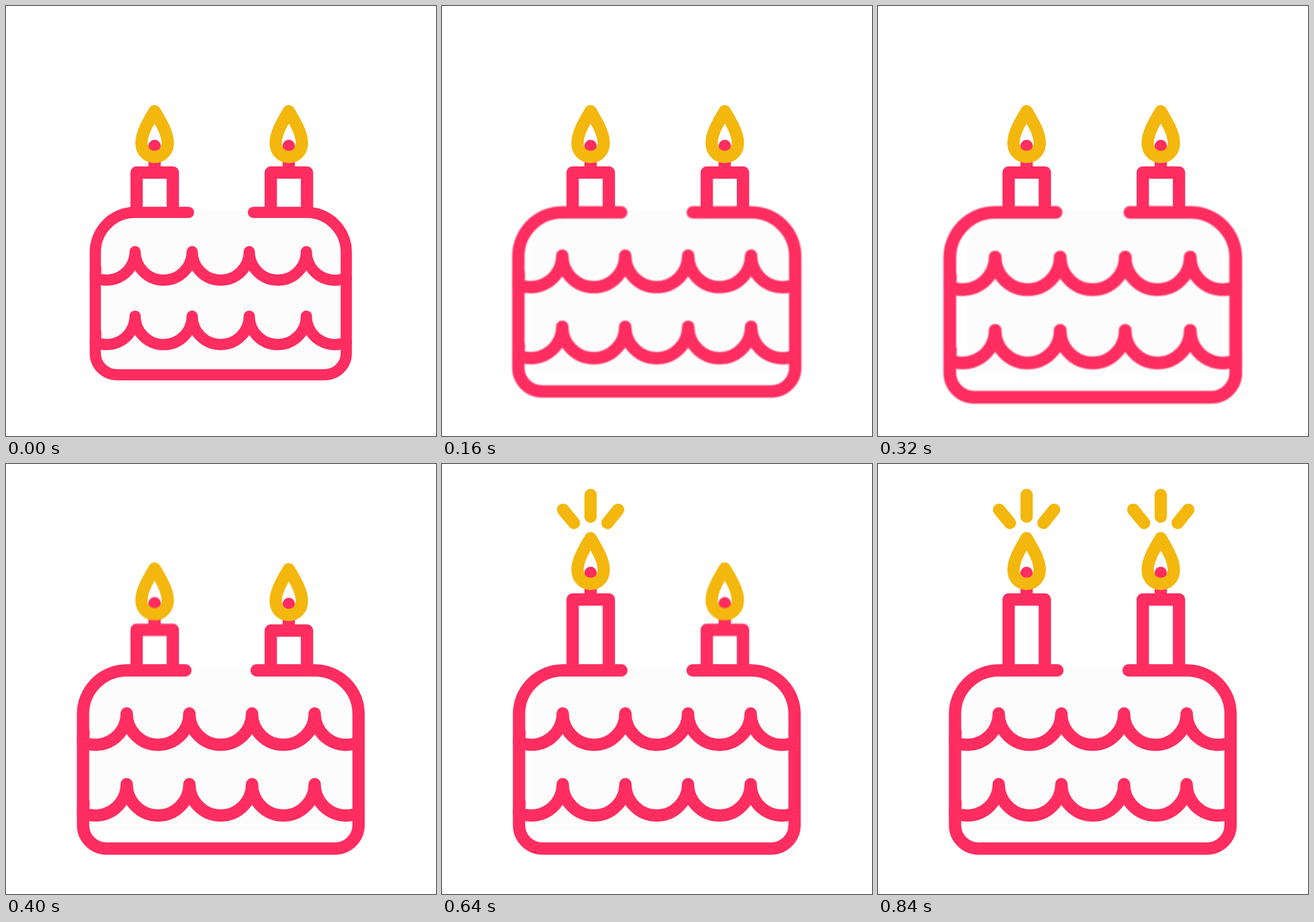
These frames come from a looping animation (748 by 748 pixels, 880 ms). An HTML page:

```html
<!DOCTYPE html>
<html lang="en">
<head>
<meta charset="utf-8">
<title>Birthday cake</title>
<style>
  html, body { margin: 0; width: 100%; height: 100%; overflow: hidden; background: #fff; }
  svg { display: block; width: 100%; height: 100%; }
  .line { fill: none; stroke: #ff2d60; stroke-width: 21.4; stroke-linecap: round; stroke-linejoin: round; }
  .gold { stroke: #f4b70e; }
  .butt { stroke-linecap: butt; }
</style>
</head>
<body>
<svg viewBox="0 0 748 748">
  <defs>
    <filter id="soft" filterUnits="userSpaceOnUse" x="0" y="0" width="748" height="748" color-interpolation-filters="sRGB">
      <feGaussianBlur stdDeviation="0.8"/>
    </filter>
  </defs>
  <path fill="#fcfcfc" d="M155 637V428a72 72 0 0 1 72-72H526a72 72 0 0 1 72 72V637Z"/>
  <g id="candles"></g>
  <g id="cake" class="line">
    <path d="M312 359H210A76 76 0 0 0 134 435V628A41 41 0 0 0 175 669H572.3A41 41 0 0 0 613.3 628V435A76 76 0 0 0 537.3 359H436"/>
    <path id="icing" d="M135 466L134 484A54.5 54.5 0 0 0 210 434a54.5 54.5 0 0 0 109 0a54.5 54.5 0 0 0 109 0a54.5 54.5 0 0 0 109 0A54.5 54.5 0 0 0 613.3 484"/>
    <use href="#icing" y="123"/>
  </g>
</svg>
<script>
const LOOP = 880, STEP = 40, LIFT = 54;
const $ = id => document.getElementById(id);
const clamp = u => Math.min(1, Math.max(0, u));
const ease = (t, a, b) => { const u = clamp((t - a) / (b - a)); return u * u * (3 - 2 * u); };
const speed = (t, a, b) => { const u = clamp((t - a) / (b - a)); return 6 * u * (1 - u) / (b - a); };

function makeCandle(x, start) {
  const id = 'blur' + start;
  document.querySelector('defs').insertAdjacentHTML('beforeend', `
    <filter id="${id}" filterUnits="userSpaceOnUse" x="-300" y="0" width="1048" height="748" color-interpolation-filters="sRGB">
      <feGaussianBlur stdDeviation="0 1"/>
    </filter>`);
  $('candles').insertAdjacentHTML('beforeend', `
    <g class="line" transform="translate(${x})">
      <path class="rays gold" d="M258.5 54V91.5M210.7 79.6L229.5 102.5M306.3 79.6L287.9 102.5"/>
      <path class="body butt"/>
      <g class="top">
        <path d="M258.5 243.5V289.5"/>
        <path class="gold" d="M258.5 183C246 204 235.7 222 235.7 238C235.7 253 246 262.5 258.5 262.5S281.3 253 281.3 238C281.3 222 271 204 258.5 183Z"/>
      </g>
    </g>`);
  const g = $('candles').lastElementChild;
  const [rays, body, top] = ['.rays', '.body', '.top'].map(s => g.querySelector(s));
  const blur = $(id).firstElementChild;

  return t => {
    const rise = [t - start, 0, 113];
    const y = LIFT * ease(...rise);
    const shine = ease(t - start, 65, 195);
    const smear = 5 * LIFT * speed(...rise);
    body.setAttribute('d', `M227.2 359V${289.7 - y}H290.2V359`);
    top.setAttribute('transform', `translate(0 ${-y})`);
    rays.setAttribute('transform', `translate(0 ${39 * (1 - shine)})`);
    rays.setAttribute('opacity', shine);
    blur.setAttribute('stdDeviation', `0 ${smear.toFixed(2)}`);
    if (smear > 0.05) g.setAttribute('filter', `url(#${id})`);
    else g.removeAttribute('filter');
  };
}

const candles = [makeCandle(0, 390), makeCandle(233.4, 630)];

function drawCake(t) {
  const s = 0.911 + 0.158 * ease(t, 34, 258) - 0.069 * ease(t, 258, 390);
  const cake = $('cake');
  cake.setAttribute('transform', `translate(373.6 359) scale(${s}) translate(-373.6 -359)`);
  if (t > 0 && t < 390) cake.setAttribute('filter', 'url(#soft)');
  else cake.removeAttribute('filter');
}

function draw(now) {
  // The first pose holds for two steps.
  const k = Math.floor((now % LOOP) / STEP);
  const t = k < 2 ? 0 : k * STEP;
  drawCake(t);
  candles.forEach(c => c(t));
}

function tick() {
  draw(performance.now());
  requestAnimationFrame(tick);
}
tick();
</script>
</body>
</html>
```
